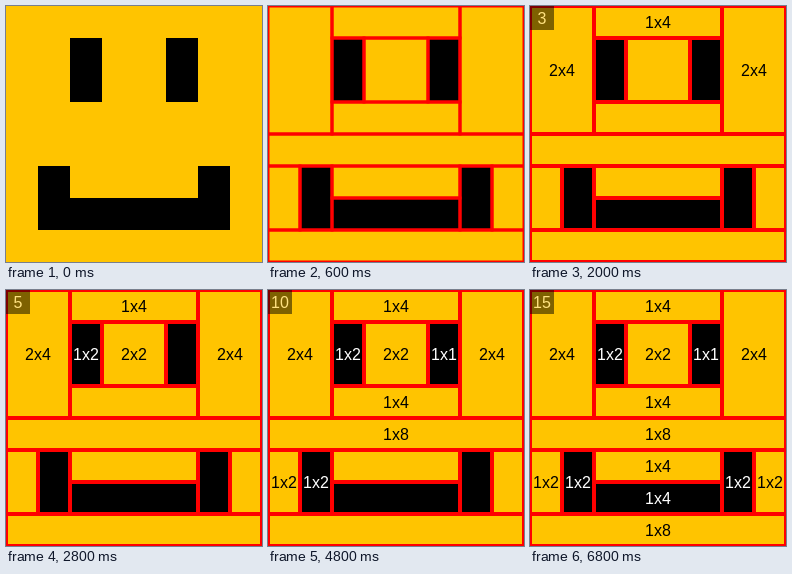
These frames come from a looping animation (256x256 px, 8600 ms). An HTML page:

```html
<!DOCTYPE html>
<html lang="en">
<head>
<meta charset="utf-8">
<title>Brick face</title>
<style>
  html, body { margin: 0; height: 100%; overflow: hidden; background: #ffc400; }
  svg { display: block; width: 100vw; height: 100vh; }
  text { font: 16px "Liberation Sans", Arial, sans-serif; text-anchor: middle; }
  #outlines { fill: none; stroke: #f00; }
  #badge { opacity: .5; }
  #badge text { fill: #fff; }
</style>
</head>
<body>
<svg viewBox="0 0 256 256">
  <g id="fills"></g>
  <g id="outlines"></g>
  <g id="labels"></g>
  <g id="badge"><rect width="24" height="24"/><text x="12" y="17.5"></text></g>
</svg>
<script>
const LOOP = 8600, CELL = 32;
const YELLOW = '#ffc400', BLACK = '#000';

// Bricks in counting order: column, row, width, height, colour, label
const bricks = [
  [0, 0, 2, 4, YELLOW, '2x4'],
  [2, 0, 4, 1, YELLOW, '1x4'],
  [6, 0, 2, 4, YELLOW, '2x4'],
  [2, 1, 1, 2, BLACK, '1x2'],
  [3, 1, 2, 2, YELLOW, '2x2'],
  [5, 1, 1, 2, BLACK, '1x1'],
  [2, 3, 4, 1, YELLOW, '1x4'],
  [0, 4, 8, 1, YELLOW, '1x8'],
  [0, 5, 1, 2, YELLOW, '1x2'],
  [1, 5, 1, 2, BLACK, '1x2'],
  [2, 5, 4, 1, YELLOW, '1x4'],
  [6, 5, 1, 2, BLACK, '1x2'],
  [7, 5, 1, 2, YELLOW, '1x2'],
  [2, 6, 4, 1, BLACK, '1x4'],
  [0, 7, 8, 1, YELLOW, '1x8']
];

const byId = id => document.getElementById(id);
const fills = byId('fills'), outlines = byId('outlines');
const labels = byId('labels'), badge = byId('badge');
const counter = badge.querySelector('text');

function add(parent, tag, attrs, content = '') {
  const node = document.createElementNS('http://www.w3.org/2000/svg', tag);
  for (const key in attrs) node.setAttribute(key, attrs[key]);
  node.textContent = content;
  parent.append(node);
  return node;
}

const labelNodes = bricks.map(([col, row, w, h, color, label]) => {
  const box = { x: col * CELL, y: row * CELL, width: w * CELL, height: h * CELL };
  add(fills, 'rect', { ...box, fill: color });
  add(outlines, 'rect', box);
  return add(labels, 'text', {
    x: box.x + box.width / 2,
    y: box.y + box.height / 2 + 5.5,
    fill: color === BLACK ? '#fff' : '#000'
  }, label);
});

function draw() {
  const t = performance.now() % LOOP;
  const lineWidth = Math.min(4, Math.floor(t / 200));
  const count = Math.max(0, Math.min(bricks.length, Math.floor(t / 400) - 2));

  outlines.setAttribute('stroke-width', lineWidth);
  labelNodes.forEach((node, i) => node.setAttribute('visibility', i < count ? 'visible' : 'hidden'));
  badge.setAttribute('visibility', count ? 'visible' : 'hidden');
  counter.textContent = count || '';
  requestAnimationFrame(draw);
}
draw();
</script>
</body>
</html>
```
